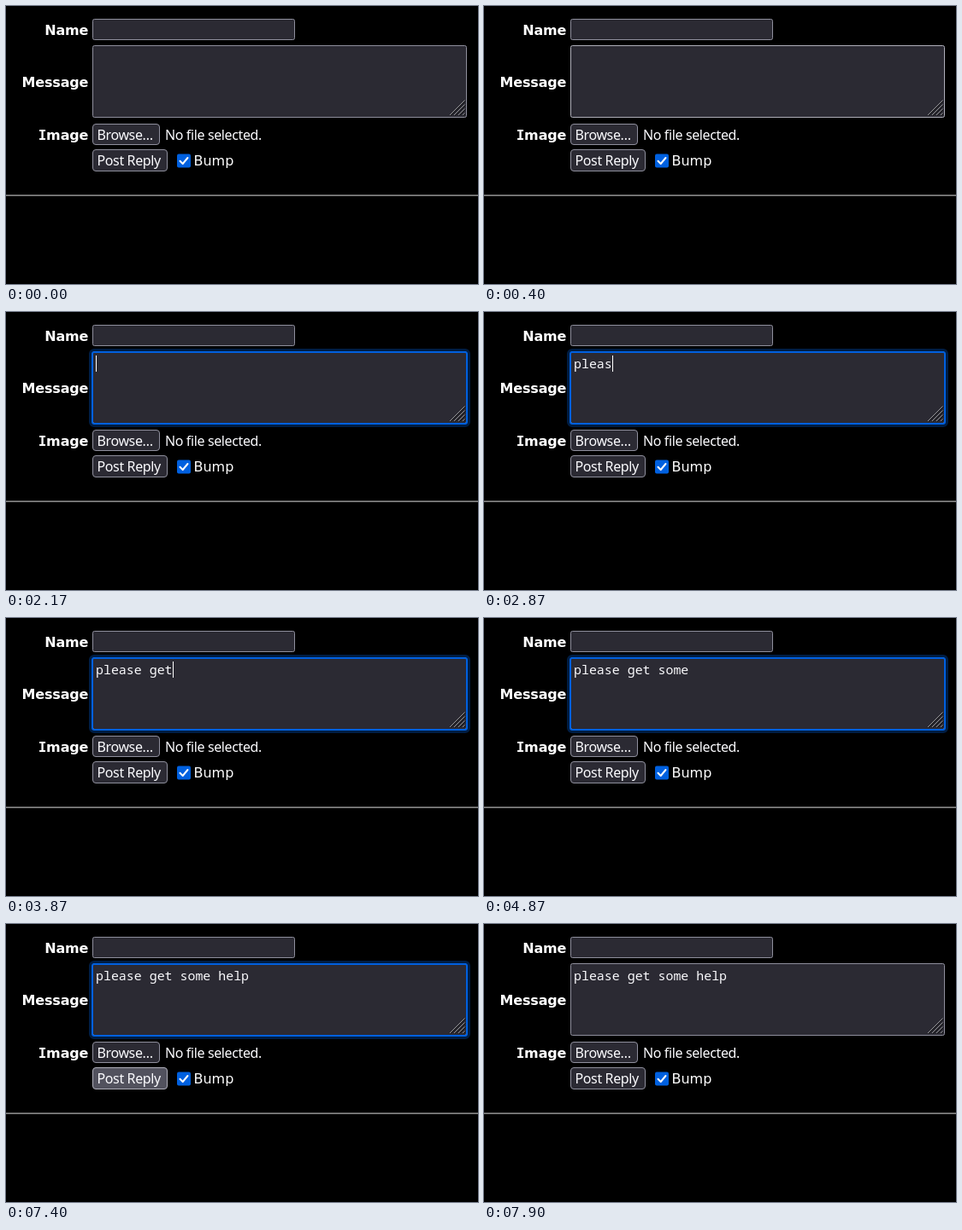
Animation, 552 px wide and 326 px high, one loop 7960 ms. Source, as an HTML page:

```html
<!DOCTYPE html>
<html lang="en">
<head>
<meta charset="utf-8">
<title>Reply form</title>
<style>
  html, body { margin: 0; width: 100%; height: 100%; overflow: hidden; background: #000; }
  svg { display: block; }
  text { fill: #fff; font-size: 16px; white-space: pre; }
  .label { font-family: "DejaVu Sans", sans-serif; }
  .head { font-weight: bold; text-anchor: end; letter-spacing: -.15px; }
  .serifed { font-family: "DejaVu Sans Mono", monospace; }
  .control { font-family: "Noto Sans", sans-serif; letter-spacing: -.38px; fill: #fbfbfe; }
  .typed { font: 14.93px "Noto Sans Mono", monospace; fill: #fbfbfe; }
  .box { fill: #2b2a33; stroke: #8f8f9d; }
  #message.hover { stroke: #afafba; }
  #post.hover { fill: #52525e; stroke: #afafba; }
  .ring { fill: none; stroke: #0060df; }
</style>
</head>
<body>
<svg width="552" height="326" viewBox="0 0 552 326">
  <g class="label head">
    <text x="96.3" y="34">Name</text>
    <text x="96.3" y="95">Message</text>
    <text x="96.3" y="157"><tspan class="serifed">I</tspan>mage</text>
  </g>

  <rect class="box" x="101.5" y="15.5" width="236" height="24" rx="2"/>
  <rect class="box" id="message" x="101.5" y="46.5" width="437" height="84" rx="2"/>
  <g id="focus">
    <rect class="ring" x="98.5" y="44.5" width="443" height="89" rx="4.5" stroke-width="3" opacity=".3"/>
    <rect class="ring" x="101" y="47" width="438" height="84" rx="2" stroke-width="2"/>
  </g>
  <g fill="none">
    <path d="M520 128.5L537 111.5M525 128.5L537 116.5M530 128.5L537 121.5M535 128.5L537 126.5" stroke="#111"/>
    <path d="M519 128L536.5 110.5M524 128L536.5 115.5M529 128L536.5 120.5M534 128L536.5 125.5" stroke="#98989c"/>
  </g>
  <text class="typed" id="typed" x="105" y="66"></text>
  <rect id="caret" y="51" width="1" height="19" fill="#fff"/>

  <rect class="box" x="101.5" y="138.5" width="78" height="24" rx="3.5"/>
  <text class="control" x="106.5" y="157">Browse…</text>
  <text class="control" x="186" y="157">No file selected.</text>

  <rect class="box" id="post" x="101.5" y="168.5" width="87" height="25" rx="3.5"/>
  <text class="control" x="106.5" y="187">Post Reply</text>

  <rect x="200" y="173.5" width="16" height="16" rx="2" fill="#0060df"/>
  <path d="M203.5 181.8L206.7 185L212.5 178" fill="none" stroke="#fff" stroke-width="2" stroke-linecap="round" stroke-linejoin="round"/>
  <text class="label" x="219.5" y="187">Bump</text>

  <path d="M0 221.5H552" stroke="#606060"/>
  <path d="M0 222.5H552" stroke="#808080"/>
</svg>
<script>
const LOOP = 7960, FOCUS = 1100, BLUR = 7900;
const MESSAGE = "please get some help";
const KEYS = [2270, 2400, 2630, 2770, 2870, 3070, 3170, 3600, 3700, 3870,
              4130, 4270, 4370, 4470, 4630, 4770, 5270, 5370, 5570, 5670];
const BLINKS = [1630, 2170, 2700, 3230, 3770, 4300, 4870, 5430, 5930, 6500, 7030, 7570];
const CHAR_WIDTH = 8.958;

const [message, focusRing, typed, caret, post] =
  ["message", "focus", "typed", "caret", "post"].map(id => document.getElementById(id));
const within = (t, from, to) => t >= from && t < to;
const show = (node, on) => node.setAttribute("visibility", on ? "visible" : "hidden");

function render(t) {
  const count = KEYS.filter(k => k <= t).length;
  const focused = within(t, FOCUS, BLUR);
  // A key press makes the caret visible; each blink tick then toggles it.
  const reset = count ? KEYS[count - 1] : FOCUS;
  const toggles = BLINKS.filter(b => b > reset && b <= t).length;

  typed.textContent = MESSAGE.slice(0, count);
  caret.setAttribute("x", Math.round(105 + count * CHAR_WIDTH));
  show(caret, focused && toggles % 2 === 0);
  show(focusRing, focused);
  message.classList.toggle("hover", within(t, 400, FOCUS));
  post.classList.toggle("hover", within(t, 7400, 7430));
}

const start = performance.now();
function tick() {
  render((performance.now() - start) % LOOP);
  requestAnimationFrame(tick);
}
tick();
</script>
</body>
</html>
```
